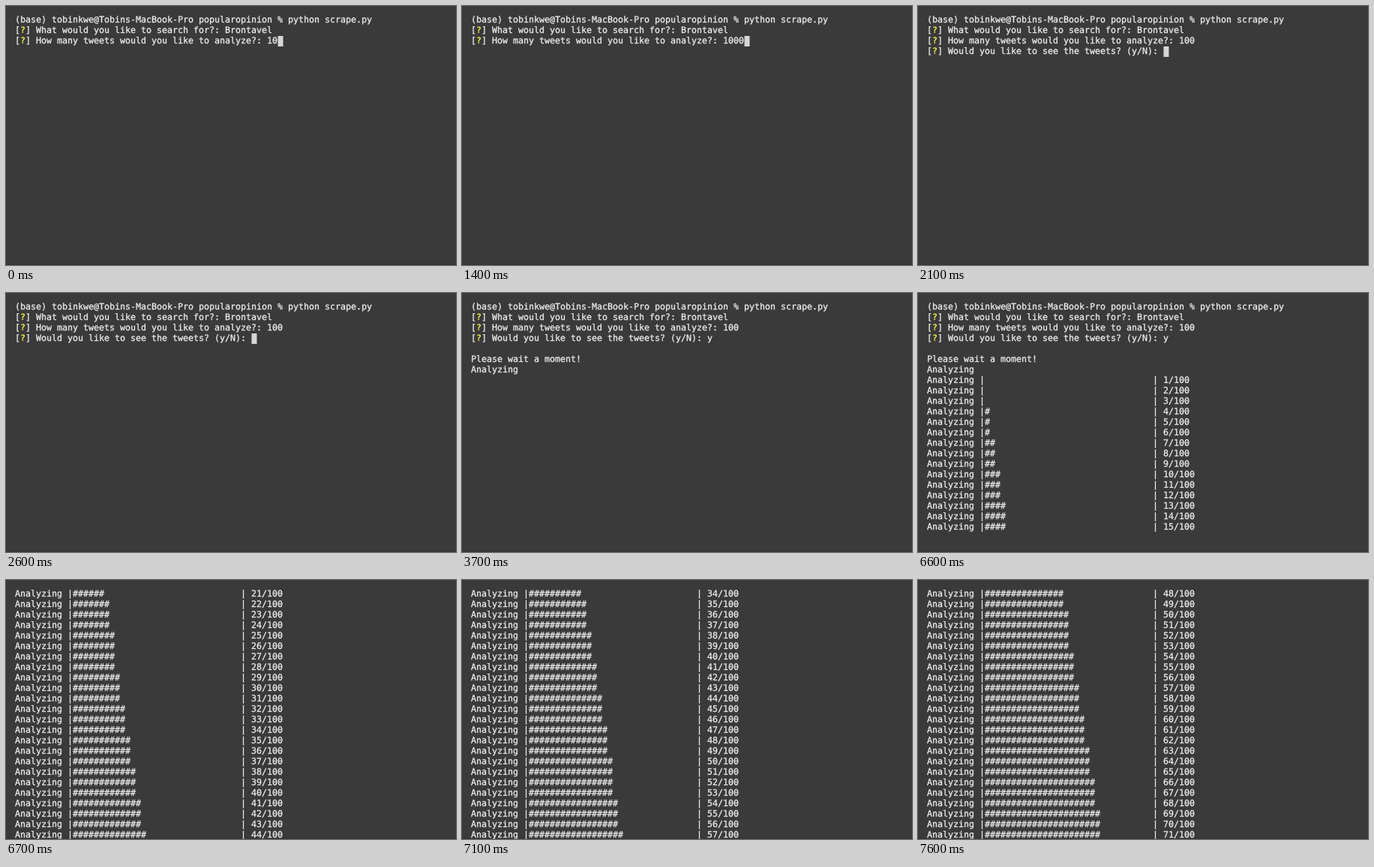
Animation, 600 px wide and 346 px high, one loop 8 s. Source, as an HTML page:

```html
<!DOCTYPE html>
<html lang="en">
<head>
<meta charset="utf-8">
<title>Terminal</title>
<style>
  html, body { margin: 0; height: 100%; overflow: hidden; background: #3a3a3a; }
  svg { display: block; width: 600px; height: 346px; }
  text {
    font: 11.645px "DejaVu Sans Mono", monospace;
    fill: #ececec;
    stroke: #ececec;
    stroke-width: 0.3px;
    white-space: pre;
    text-rendering: geometricPrecision;
  }
  .mark { fill: #eef04a; stroke: none; font-weight: bold; }
</style>
</head>
<body>
<svg viewBox="0 0 600 346">
  <rect width="600" height="346" fill="#3a3a3a"/>
  <rect y="345" width="600" height="1" fill="#343434"/>
  <rect id="cursor" width="7" height="14" fill="#d6d6d6"/>
  <g id="screen"></g>
</svg>
<script>
const LOOP = 8000, CELL = 7.01, LINE = 14, LEFT = 12, BASE = 22;
const ROWS = 24, BAR = 32, TOTAL = 100;
const NS = "http://www.w3.org/2000/svg";
const screen = document.getElementById("screen");
const cursor = document.getElementById("cursor");

const rows = Array.from({ length: ROWS }, (_, i) => {
  const row = document.createElementNS(NS, "text");
  row.setAttribute("x", LEFT);
  row.setAttribute("y", BASE + i * LINE);
  return screen.appendChild(row);
});

const prompt = "(base) tobinkwe@Tobins-MacBook-Pro popularopinion % python scrape.py";
const search = "[?] What would you like to search for?: Brontavel";
const amount = "[?] How many tweets would you like to analyze?: ";
const show = "[?] Would you like to see the tweets? (y/N): ";

const progress = n => {
  const bar = "#".repeat(Math.floor(n * BAR / TOTAL)).padEnd(BAR);
  return `Analyzing |${bar}| ${n}/${TOTAL}`;
};
const progressRange = (first, count) =>
  Array.from({ length: count }, (_, i) => progress(first + i));

const asking = answer => [prompt, search, amount + answer];
const confirmed = [...asking("100"), show + "y"];
const waiting = [...confirmed, "", "Please wait a moment!"];
const started = [...waiting, "Analyzing"];

// The cursor, when shown, follows the last line.
const states = [
  { at: 0, lines: asking("10"), cursor: true },
  { at: 1400, lines: asking("1000"), cursor: true },
  { at: 1700, lines: asking("100"), cursor: true },
  { at: 2100, lines: [...asking("100"), show], cursor: true },
  { at: 3500, lines: confirmed },
  { at: 3600, lines: waiting },
  { at: 3700, lines: started },
  { at: 4000, lines: [...started, ...progressRange(1, 15)] },
  { at: 6700, lines: progressRange(21, ROWS) },
  { at: 7100, lines: progressRange(34, ROWS) },
  { at: 7500, lines: progressRange(48, ROWS) }
];

const markup = line => line.replace(/^\[\?\]/, '[<tspan class="mark">?</tspan>]');

let current;
function render(time) {
  const state = states.findLast(s => s.at <= time);
  if (state === current) return;
  current = state;
  const { lines } = state;
  rows.forEach((row, i) => { row.innerHTML = markup(lines[i] || ""); });
  const last = lines.length - 1;
  cursor.setAttribute("x", LEFT + lines[last].length * CELL);
  cursor.setAttribute("y", BASE + last * LINE - 10);
  cursor.setAttribute("visibility", state.cursor ? "visible" : "hidden");
}

const start = performance.now();
function tick() {
  render((performance.now() - start) % LOOP);
  requestAnimationFrame(tick);
}
tick();
</script>
</body>
</html>
```
